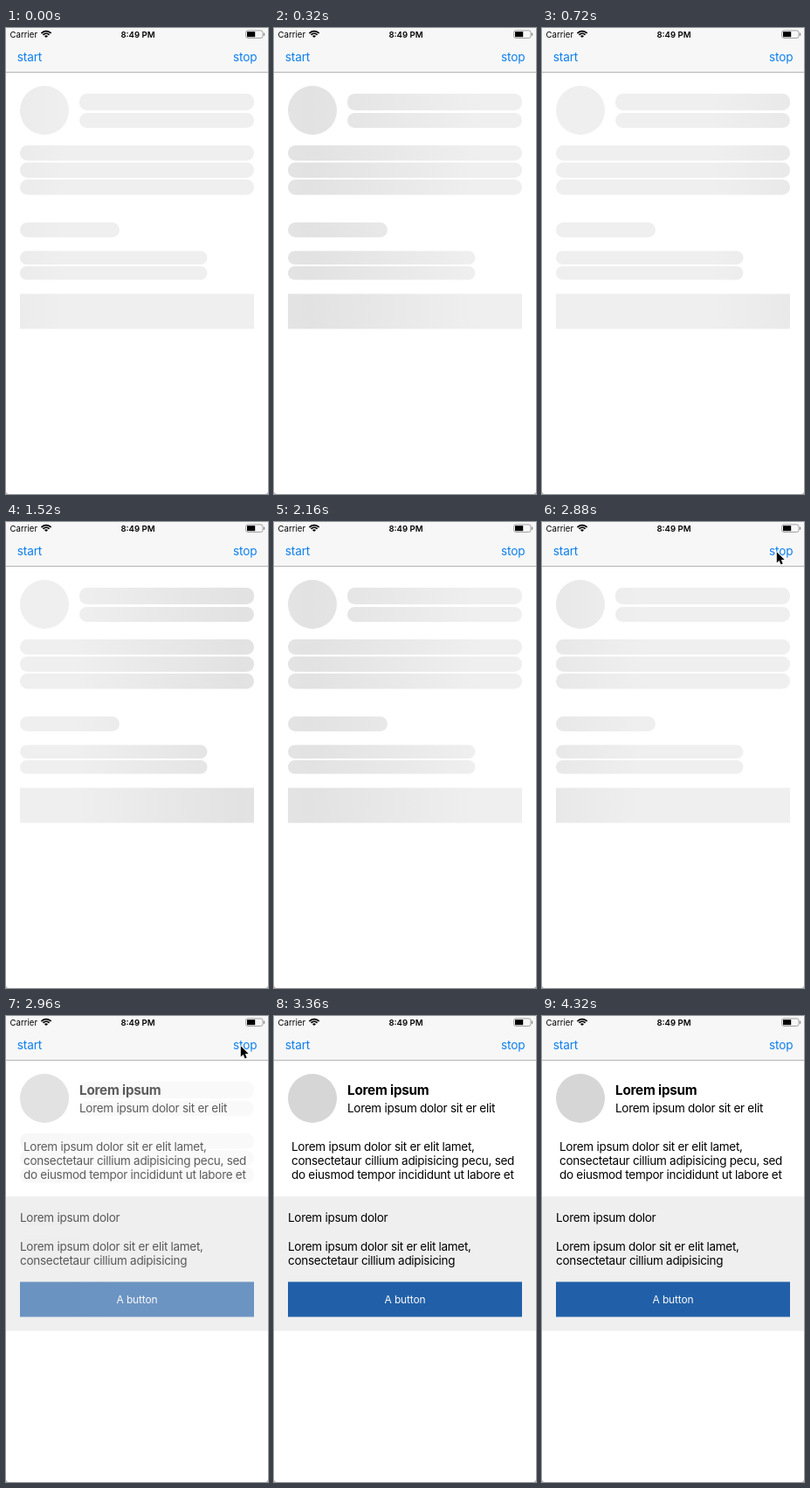
An HTML page with a canvas that plays this animation: 300 px wide and 532 px high, repeating every 4.4 s.

```html
<!DOCTYPE html>
<html lang="en">
<head>
<meta charset="utf-8">
<title>Skeleton loading</title>
<style>
  html, body { margin: 0; width: 100%; height: 100%; overflow: hidden; background: #fff; }
  canvas { display: block; width: 300px; height: 532px; }
</style>
</head>
<body>
<canvas id="stage"></canvas>
<script>
const W = 300, H = 532, LOOP = 4400;
const REVEAL = 2880, REVEAL_END = 3360;
const FONT = 'Inter, "Open Sans", sans-serif';
const BLUE = '#0d7fee';

const canvas = document.getElementById('stage');
const ctx = canvas.getContext('2d');
const dpr = window.devicePixelRatio || 1;
canvas.width = W * dpr;
canvas.height = H * dpr;

// The shimmer holds between these moments; later updates run on an 80 ms grid.
const HOLDS = [0, 320, 480, 640, 720, 1200, 1360, 1520, 1600, 1680, 2160, 2320];

// x, y, width, height
const BARS = [
  [84, 75, 200, 19], [84, 97, 200, 17],
  [16, 134, 268, 17.5], [16, 153.5, 268, 17.5], [16, 173, 268, 17.5],
  [16, 222, 114, 17],
  [16, 254.5, 214.5, 15.5], [16, 272, 214.5, 15.5]
];
const BUTTON = [16, 303.5, 268, 40];

// text, x, baseline
const BODY = [
  ['Lorem ipsum dolor sit er elit', 84, 110],
  ['Lorem ipsum dolor sit er elit lamet,', 20, 154],
  ['consectetaur cillium adipisicing pecu, sed', 20, 170],
  ['do eiusmod tempor incididunt ut labore et', 20, 186],
  ['Lorem ipsum dolor', 16, 235],
  ['Lorem ipsum dolor sit er elit lamet,', 16, 268],
  ['consectetaur cillium adipisicing', 16, 284]
];

const clamp = v => Math.max(0, Math.min(1, v));

function snap(t) {
  if (t >= 2480) return Math.floor(t / 80) * 80;
  return HOLDS.filter(h => h <= t).pop();
}

function rect(x, y, w, h, color) {
  ctx.fillStyle = color;
  ctx.fillRect(x, y, w, h);
}

function disc(x, y, r, color) {
  ctx.fillStyle = color;
  ctx.beginPath();
  ctx.arc(x, y, r, 0, Math.PI * 2);
  ctx.fill();
}

function text(str, x, y, { size = 13.5, weight = 400, color = '#000', spacing = -0.28, align = 'left' } = {}) {
  ctx.font = `${weight} ${size}px ${FONT}`;
  ctx.letterSpacing = spacing + 'px';
  ctx.textAlign = align;
  ctx.fillStyle = color;
  ctx.fillText(str, x, y);
}

function drawWifi(x, y) {
  ctx.strokeStyle = '#000';
  ctx.lineWidth = 1.6;
  for (const r of [7.4, 4.7]) {
    ctx.beginPath();
    ctx.arc(x, y, r, -Math.PI * 0.77, -Math.PI * 0.23);
    ctx.stroke();
  }
  ctx.fillStyle = '#000';
  ctx.beginPath();
  ctx.moveTo(x, y);
  ctx.arc(x, y, 2.7, -Math.PI * 0.77, -Math.PI * 0.23);
  ctx.fill();
}

function drawBattery() {
  ctx.strokeStyle = '#8c8c8c';
  ctx.lineWidth = 0.8;
  ctx.beginPath();
  ctx.roundRect(274.6, 2.9, 19.4, 8.6, 2.2);
  ctx.stroke();
  rect(276, 4.2, 9.2, 6, '#000');
  ctx.fillStyle = '#8c8c8c';
  ctx.beginPath();
  ctx.roundRect(294.9, 5.5, 1.3, 3.4, 0.6);
  ctx.fill();
}

function drawBarTop() {
  rect(0, 0, W, 50, '#f7f7f7');
  rect(0, 50, W, 1, '#b4b4b4');
  text('Carrier', 4.6, 10.7, { size: 9.6, spacing: 0 });
  drawWifi(46, 11);
  text('8:49 PM', 151, 10.7, { size: 9.6, weight: 600, spacing: 0, align: 'center' });
  drawBattery();
  text('start', 12.8, 37.5, { size: 13.6, color: BLUE, spacing: -0.15 });
  text('stop', 260, 37.5, { size: 13.6, color: BLUE, spacing: -0.15 });
}

function shimmer(t) {
  const phase = ((t + 140) % 920) / 920;
  const mid = -150 + 600 * Math.pow(phase, 1.65);
  const fill = ctx.createLinearGradient(mid - 190, 0, mid + 190, 0);
  fill.addColorStop(0, '#efefef');
  fill.addColorStop(0.5, '#e2e2e2');
  fill.addColorStop(1, '#efefef');
  return fill;
}

function drawSkeleton(t) {
  const fill = shimmer(t);
  disc(44, 94, 28, fill);
  for (const [x, y, w, h] of BARS) {
    ctx.beginPath();
    ctx.roundRect(x, y, w, h, Math.min(h / 2, 8.5));
    ctx.fill();
  }
  rect(...BUTTON, fill);
}

function drawContent() {
  disc(44, 94, 28, '#d6d6d6');
  text('Lorem ipsum', 84, 89.7, { size: 15.2, weight: 700, spacing: -0.2 });
  for (const line of BODY) text(...line);
  rect(...BUTTON, '#2160a8');
}

function drawCursor(t) {
  if (t < 2480 || t >= 3200) return;
  const left = Math.pow(1 - clamp((t - 2480) / 320), 2);
  ctx.save();
  ctx.translate(268.8 + 18 * left, 34.3 + 490 * left);
  ctx.beginPath();
  const shape = [[0, 0], [0, 12.2], [2.8, 9.7], [4.8, 14.2], [6.9, 13.2], [5, 8.9], [8.8, 8.7]];
  shape.forEach(p => ctx.lineTo(...p));
  ctx.closePath();
  ctx.lineJoin = 'round';
  ctx.lineWidth = 1.4;
  ctx.strokeStyle = '#fff';
  ctx.stroke();
  ctx.fillStyle = '#000';
  ctx.fill();
  ctx.restore();
}

function drawCorners() {
  ctx.fillStyle = '#aaa';
  for (const [x, side] of [[0, 1], [W, -1]]) {
    ctx.beginPath();
    ctx.moveTo(x, H - 3.5);
    ctx.quadraticCurveTo(x, H, x + side * 3.5, H);
    ctx.lineTo(x, H);
    ctx.fill();
  }
}

function draw(t) {
  const u = clamp((t - REVEAL) / (REVEAL_END - REVEAL));
  const shown = 1 - Math.pow(1 - u, 5.5);
  ctx.setTransform(dpr, 0, 0, dpr, 0, 0);
  rect(0, 0, W, H, '#fff');
  drawBarTop();
  if (shown > 0) rect(0, 206, W, 153.5, '#efefef');
  // Content fades in over the bars while they fade out.
  if (shown < 1) {
    ctx.globalAlpha = 1 - shown;
    drawSkeleton(Math.min(t, REVEAL));
  }
  if (shown > 0) {
    ctx.globalAlpha = shown;
    drawContent();
  }
  ctx.globalAlpha = 1;
  if (shown > 0) {
    text('A button', 150, 328, { size: 12, color: '#fafafa', spacing: -0.15, align: 'center' });
  }
  drawCorners();
  drawCursor(t);
}

const began = performance.now();
function tick() {
  draw(snap((performance.now() - began) % LOOP));
  requestAnimationFrame(tick);
}
tick();
</script>
</body>
</html>
```
